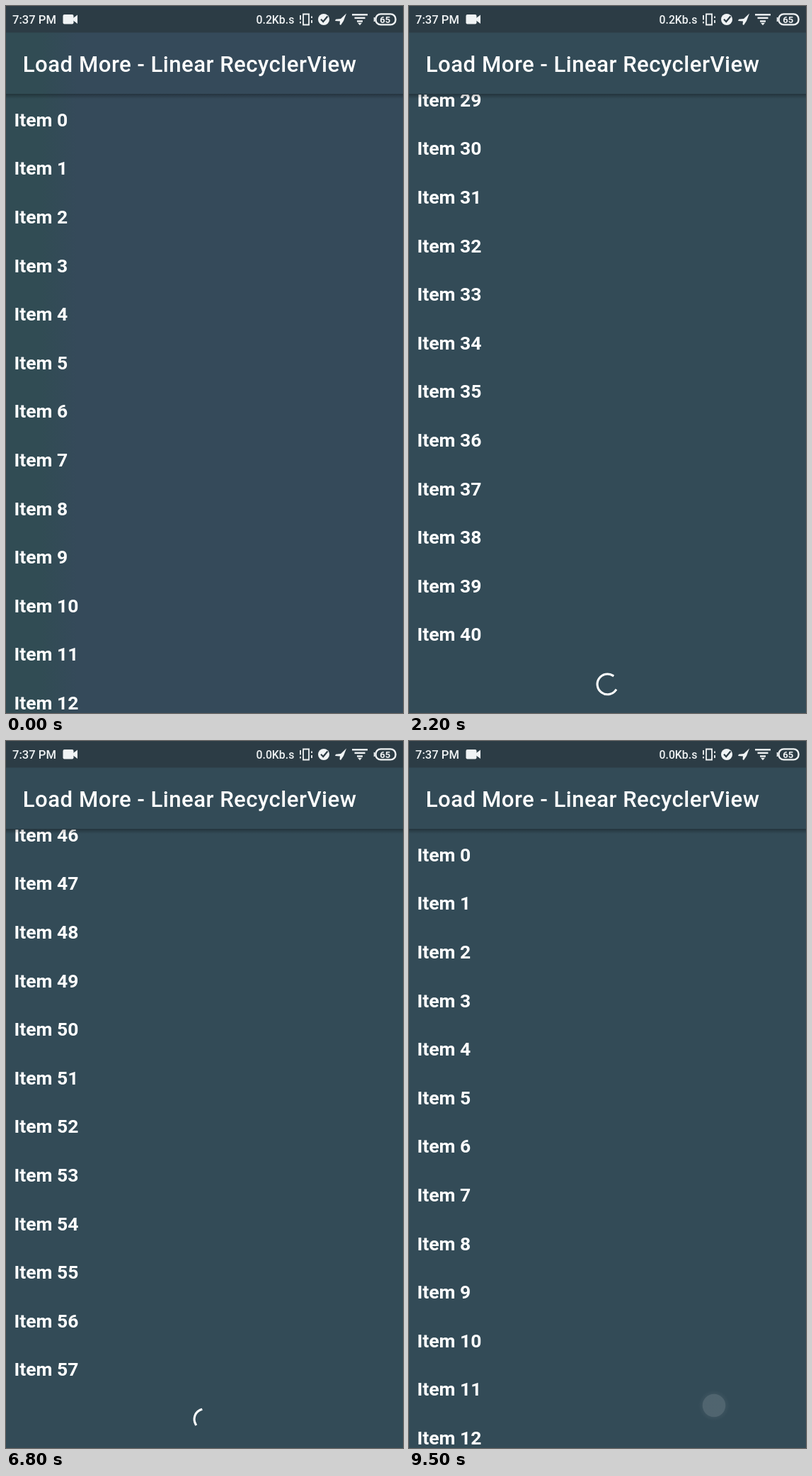
Recreate the animation shown at these times as an HTML page with a canvas. Size 561 px wide and 998 px high, loop 9.6 s.

```html
<!DOCTYPE html>
<html lang="en">
<head>
<meta charset="utf-8">
<title>Load More</title>
<style>
  html, body { margin: 0; width: 100%; height: 100%; overflow: hidden; background: #334b57; }
  canvas { display: block; width: 561px; height: 998px; }
</style>
</head>
<body>
<canvas width="561" height="998"></canvas>
<script>
const W = 561, H = 998, LOOP = 9600, STEP = 100;
const ROW = 68.6, FIRST_BASELINE = 169.8, VIEW = 795.2;
const FLING_SPEED = 6.92; // px per ms
const BG = '#334b57', BAR = '#2c3c45', ICON = '#f0f3f4';
const c = document.querySelector('canvas').getContext('2d');

// A fling down to the last row, whose spinner turns until more rows arrive
const LOADS = [
  { row: 41, fling: 1310, start: 1650, end: 4400 },
  { row: 58, fling: 4400, start: 4530, end: 7300 }
];
const RETURN = { start: 7700, end: 8600 };

const SWIPES = [
  { start: 1300, end: 1400, from: [398, 810], to: [390, 470] },
  { start: 4300, end: 4400, from: [402, 850], to: [394, 560] },
  { start: 7700, end: 7900, from: [415, 640], to: [454, 940] },
  { start: 8200, end: 8400, from: [370, 802], to: [400, 962] },
  { start: 9300, end: 9500, from: [431, 938], to: [431, 938] }
];

const clamp = v => Math.max(0, Math.min(1, v));
const mix = (a, b, k) => a + (b - a) * k;
const progress = (t, { start, end }) => clamp((t - start) / (end - start));

// Cubic easing from (0,0) to (1,1) with control points (x1,0) and (x2,1)
function ease(x, x1, x2) {
  let lo = 0, hi = 1;
  for (let i = 0; i < 24; i++) {
    const u = (lo + hi) / 2, v = 1 - u;
    if (3 * u * v * v * x1 + 3 * u * u * v * x2 + u ** 3 < x) lo = u; else hi = u;
  }
  return lo * lo * (3 - 2 * lo);
}

function scrollAt(t) {
  let y = 0;
  for (const { row, fling } of LOADS)
    y = Math.min(row * ROW - VIEW, y + FLING_SPEED * Math.max(0, t - fling));
  return y * (1 - progress(t, RETURN) ** 1.663);
}

function text(str, x, y, font, color = '#fff', spacing = 0) {
  c.font = font + ' Roboto, sans-serif';
  c.letterSpacing = spacing + 'px';
  c.fillStyle = color;
  c.fillText(str, x, y);
}

function fill(d) {
  c.fillStyle = ICON;
  c.fill(new Path2D(d));
}

function stroke(d, width = 1.8, color = ICON) {
  c.strokeStyle = color;
  c.lineWidth = width;
  c.stroke(new Path2D(d));
}

function pill(x, y, w, h, r) {
  c.beginPath();
  c.roundRect(x, y, w, h, r);
}

function gradientBox(x, y, w, h, g, from, to) {
  g.addColorStop(0, from);
  g.addColorStop(1, to);
  c.fillStyle = g;
  c.fillRect(x, y, w, h);
}

// The stage opens a little bluer, with a green left edge
function background(t, y, h) {
  c.fillStyle = BG;
  c.fillRect(0, y, W, h);
  c.globalAlpha = 1 - progress(t, { start: 500, end: 1000 });
  c.fillStyle = '#354a5a';
  c.fillRect(0, y, W, h);
  gradientBox(0, y, W, h, c.createLinearGradient(50, 0, 100, 0), '#314c54', '#314c5400');
  c.globalAlpha = 1;
}

function list(t, scroll) {
  const pending = LOADS.find(load => t < load.end);
  const count = pending ? pending.row : 75;
  const first = Math.max(0, Math.floor(scroll / ROW) - 1);
  for (let i = first; i < Math.min(count, first + 16); i++)
    text('Item ' + i, 11.5, FIRST_BASELINE + i * ROW - scroll, 'bold 26.5px');
}

function spinner(t, scroll) {
  for (const { row, start, end } of LOADS) {
    if (t < start || t >= end) continue;
    const age = t - start, p = age % 1333 / 1333;
    const head = .75 * ease(clamp(p * 2), .4, .2);
    const tail = .75 * ease(clamp(p * 2 - 1), .4, .2);
    const turn = 2 * age / 4444 + p / 4 - .25;
    c.beginPath();
    c.arc(280.5, 162.2 + row * ROW - scroll, 14.4,
      (turn + tail) * 2 * Math.PI, (turn + head) * 2 * Math.PI);
    c.strokeStyle = '#fff';
    c.lineWidth = 3.1;
    c.lineCap = 'square';
    c.stroke();
    c.lineCap = 'butt';
  }
}

function statusBar(t) {
  c.fillStyle = BAR;
  c.fillRect(0, 0, W, 37.5);
  text('7:37 PM', 9, 25, '500 16.6px', ICON);
  text(t < 2700 ? '0.2Kb.s' : '0.0Kb.s', 353.5, 24.8, '500 15.8px', ICON);

  // camera
  c.fillStyle = ICON;
  pill(80.5, 12, 15, 13.5, 2);
  c.fill();
  fill('M95 17 L101 12.5 V25 L95 20.5Z');

  // vibration
  stroke('M420 11.5 h8 v15 h-8Z M416 13 v6.5 m0 2.5 v2.5 M432 14.5 v2.5 m0 3 v4');

  // check mark
  c.fillStyle = ICON;
  c.beginPath();
  c.arc(449, 19, 8, 0, 7);
  c.fill();
  stroke('M445 18.8 L448.2 22 L454.5 14.5', 2.2, BAR);

  // plane
  fill('M481 10.5 L477 21 L473 27 L471.5 26 L472 21.5 L465 21 L466 18.8 L473 18Z');

  // signal
  for (let i = 0; i < 3; i++)
    stroke(`M${489 + 3.5 * i} ${12.3 + 4.6 * i} h${22 - 7 * i}`, 2.4);
  fill('M497 23.8 h6 l-3 3.4Z');

  // battery
  pill(522.5, 11.4, 28, 15, 7);
  c.stroke();
  stroke('M520.6 16 v6');
  text('65', 528.3, 23.6, 'bold 13px', ICON);
}

function appBar(t) {
  background(t, 37, 88);
  gradientBox(0, 124, W, 7, c.createLinearGradient(0, 124, 0, 131), '#0000004d', '#0000');
  text('Load More - Linear RecyclerView', 23.7, 93.2, '500 31.2px', '#fff', .46);
}

function touch(t) {
  for (const swipe of SWIPES) {
    if (t < swipe.start || t > swipe.end) continue;
    const k = progress(t, swipe);
    const [x, y] = swipe.from.map((v, i) => mix(v, swipe.to[i], k));
    c.globalAlpha = .21 - .09 * k * k;
    gradientBox(x - 22, y - 22, 44, 44, c.createRadialGradient(x, y, 15, x, y, 22), '#fff6', '#fff0');
    c.fillStyle = '#ffffffd0';
    c.beginPath();
    c.arc(x, y, 16.3, 0, 7);
    c.fill();
    c.globalAlpha = 1;
  }
}

function frame() {
  const t = Math.floor(performance.now() % LOOP / STEP) * STEP;
  const scroll = scrollAt(t);
  background(t, 0, H);
  list(t, scroll);
  spinner(t, scroll);
  appBar(t);
  statusBar(t);
  touch(t);
  requestAnimationFrame(frame);
}
frame();
</script>
</body>
</html>
```
